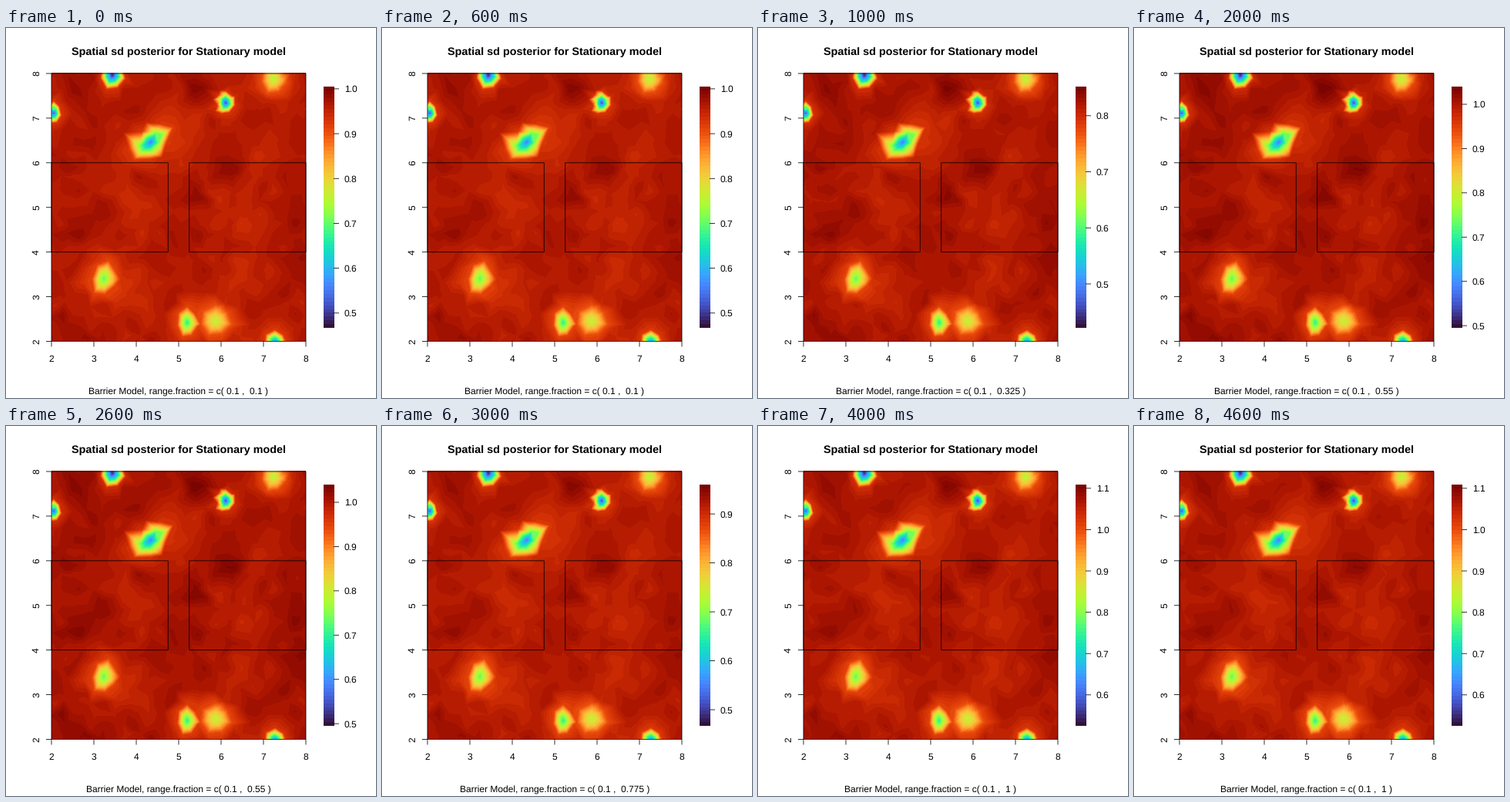
Recreate the animation shown at these times as a matplotlib script. Size 480 by 480 pixels, loop 5 s.

```python
import numpy as np
import matplotlib.pyplot as plt
from matplotlib.animation import ArtistAnimation
from matplotlib.path import Path
from matplotlib.tri import LinearTriInterpolator, Triangulation

SIZE, DPI = 480, 100
PX = 72 / DPI  # points per pixel
L, R, T, B = 59, 389, 59, 406.5  # map
BAR_L, BAR_R, BAR_T, BAR_B = 411.5, 425, 76, 389  # colour key
TURBO = plt.get_cmap("turbo", 64)
plt.rcParams["font.family"] = "Liberation Sans"
plt.rcParams["text.hinting"] = "none"

FRACTIONS = np.linspace(0.1, 1, 5)
KEYS = [(0.467, 1.005), (0.4216, 0.852), (0.495, 1.040), (0.467, 0.960), (0.525, 1.109)]
SHIFTS = [0, 0.012, 0.02, 0, 0.004]  # background darkening

# Observation spots: x, y, half width, half height, tilt, lowest value
SPOTS = [
    (138, 62, 17, 20, 0, 0.02),
    (62, 111, 10, 15, 0, 0.10),
    (285, 98, 12, 15, 0, 0.08),
    (188, 149, 34, 17, -40, 0.16),
    (347, 67, 17, 20, 0, 0.52),
    (127, 326, 16, 23, 15, 0.42),
    (235, 383, 14, 20, 0, 0.36),
    (272, 381, 21, 20, 0, 0.53),
    (349, 408, 15, 15, 0, 0.18),
]
LIGHT = [(150, 215), (178, 242), (272, 232), (328, 170),
         (320, 255), (172, 345), (310, 315), (225, 130)]
DARK = [(160, 105), (95, 82), (250, 82), (125, 238), (180, 198), (292, 185),
        (90, 272), (248, 220), (375, 306), (225, 355), (85, 395), (375, 247)]


def bump(x, y, cx, cy, r):
    return np.exp(-((x - cx) ** 2 + (y - cy) ** 2) / (2 * r * r))


def halo(low):
    return 0.03 + 0.1 * low


def ring(cx, cy, a, b, tilt, size):
    """Corners of a slightly uneven heptagon inside a tilted ellipse."""
    k = np.arange(7)
    t = 2 * np.pi * k / 7 - np.pi / 2
    size = size * (1 + 0.06 * np.cos(3 * k))
    u, w = a * size * np.cos(t), b * size * np.sin(t)
    c, s = np.cos(np.radians(tilt)), np.sin(np.radians(tilt))
    return np.column_stack([cx + u * c - w * s, cy + u * s + w * c])


def background(x, y, rng):
    v = 0.928 + rng.normal(0, 0.012, x.shape)
    for cx, cy, a, b, _, low in SPOTS:
        v -= halo(low) * bump(x, y, cx, cy, 1.1 * max(a, b))
    for cx, cy in LIGHT:
        v -= 0.032 * bump(x, y, cx, cy, 22)
    for cx, cy in DARK:
        v += 0.045 * bump(x, y, cx, cy, 12)
    return v


def make_field():
    """Linear interpolation over an irregular triangle mesh."""
    rng = np.random.default_rng(4)
    step = 17
    gx, gy = np.meshgrid(np.arange(L - 40, R + 41, step),
                         np.arange(T - 40, B + 41, step * 0.87))
    gx = gx + step / 2 * (np.arange(len(gx)) % 2)[:, None]
    pts = np.column_stack([gx.ravel(), gy.ravel()]) + rng.uniform(-4, 4, (gx.size, 2))
    keep = np.ones(len(pts), bool)
    nodes, values = [], []
    for *shape, low in SPOTS:
        rim = 0.9 - halo(low)
        keep &= ~Path(ring(*shape, 1.3)).contains_points(pts)
        nodes += [[shape[:2]], ring(*shape, 0.5), ring(*shape, 1)]
        values += [[low], [low + 0.42 * (rim - low)] * 7, [rim] * 7]
    pts = pts[keep]
    x, y = np.vstack([pts, *nodes]).T
    v = np.concatenate([background(*pts.T, rng), *values])
    px, py = np.meshgrid(np.arange(L, R) + 0.5, np.arange(T, B) + 0.5)
    return np.asarray(LinearTriInterpolator(Triangulation(x, y), v)(px, py))


fig = plt.figure(figsize=(SIZE / DPI, SIZE / DPI), dpi=DPI, facecolor="white")
ax = fig.add_axes([0, 0, 1, 1])
ax.set_xlim(0, SIZE)
ax.set_ylim(SIZE, 0)
ax.axis("off")


def line(xs, ys):
    return ax.plot(xs, ys, color="black", lw=0.8 * PX, zorder=3, snap=False,
                   solid_capstyle="butt", solid_joinstyle="miter")[0]


def label(x, y, s, size=12, **kw):
    kw.setdefault("ha", "center")
    return ax.text(x, y, s, fontsize=size * PX, va="baseline", **kw)


def picture(data, box):
    return ax.imshow(data, cmap=TURBO, vmin=0, vmax=1, extent=box,
                     aspect="auto", interpolation="nearest", zorder=1)


def outline(l, r, t, b):
    line([l, r, r, l, l], [t, t, b, b, t])


def map_x(n):
    return L + (n - 2) * (R - L) / 6


def map_y(n):
    return B - (n - 2) * (B - T) / 6


label(224, 35, "Spatial sd posterior for Stationary model", 14.4, weight="bold")
for n in range(2, 9):
    x, y = map_x(n), map_y(n)
    line([x, x], [B, B + 7])
    line([L, L - 7], [y, y])
    label(x, 433, str(n))
    label(43, y, str(n), rotation=90, rotation_mode="anchor")

outline(L, R, T, B)
outline(L, map_x(4.75), map_y(6), map_y(4))
outline(map_x(5.25), R, map_y(6), map_y(4))
picture(np.linspace(1, 0, 64)[:, None], (BAR_L, BAR_R, BAR_B, BAR_T))

field = make_field()


def scene(fraction, key, shift):
    lo, hi = key
    shown = np.clip(field + shift * field ** 4, 0, 1)
    parts = [picture(shown, (L, R, B, T)),
             label(224, 476, f"Barrier Model, range.fraction = c( 0.1 ,  {fraction:g} )")]
    for k in range(int(np.ceil(lo * 10)), int(hi * 10) + 1):
        y = BAR_B - (k / 10 - lo) / (hi - lo) * (BAR_B - BAR_T)
        parts.append(line([BAR_R, BAR_R + 7], [y, y]))
        parts.append(label(439, y + 4.4, f"{k / 10:.1f}", ha="left"))
    return parts


anim = ArtistAnimation(fig, [scene(*s) for s in zip(FRACTIONS, KEYS, SHIFTS)],
                       interval=1000, repeat=True, repeat_delay=0)
plt.show()
```
